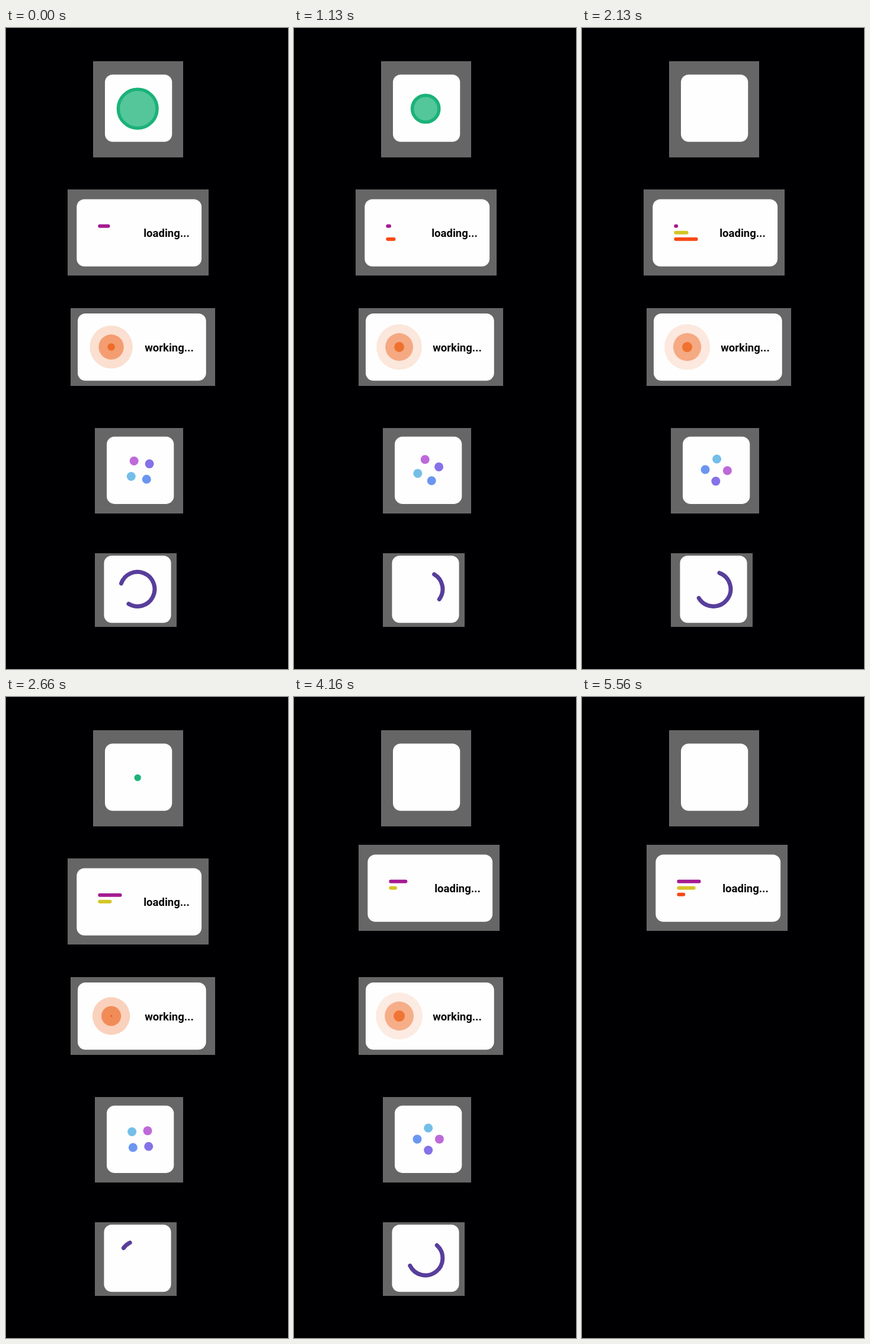
Animation, 476 px wide and 1080 px high, one loop 5600 ms. Source, as an HTML page:

```html
<!DOCTYPE html>
<html lang="en">
<head>
<meta charset="utf-8">
<title>Loaders</title>
<style>
  html, body { margin: 0; width: 100%; height: 100%; overflow: hidden; background: #000002; }
  svg { display: block; width: 476px; height: 1080px; }
  text { font: 700 18.5px Roboto, "Open Sans", sans-serif; fill: #060608; }
  .back { fill: #666; }
  .card { fill: #fefefe; }
  .bar { stroke-width: 6; stroke-linecap: round; }
</style>
</head>
<body>
<svg id="stage" viewBox="0 0 476 1080"></svg>
<script>
const LOOP = 5600;
const MOVE_AT = 4060;
const stage = document.getElementById('stage');

function add(parent, tag, attrs) {
  const el = document.createElementNS('http://www.w3.org/2000/svg', tag);
  set(el, attrs);
  parent.appendChild(el);
  return el;
}

function set(el, attrs) {
  for (const k in attrs) el.setAttribute(k, attrs[k]);
}

function panel(back, card) {
  const g = add(stage, 'g', {});
  const rect = ([x, y, width, height], cls, rx) =>
    add(g, 'rect', { x, y, width, height, class: cls, rx });
  rect(back, 'back', 0);
  rect(card, 'card', 13);
  return g;
}

const unit = v => Math.min(1, Math.max(0, v));
const mod = (v, n) => ((v % n) + n) % n;
const show = (el, on) => el.style.display = on ? '' : 'none';
const easeOut = power => x => 1 - (1 - x) ** power;
const smoothstep = x => x * x * (3 - 2 * x);

// cubic-bezier(.4, 0, .2, 1)
function fastOutSlowIn(x) {
  let lo = 0, hi = 1;
  for (let i = 0; i < 20; i++) {
    const s = (lo + hi) / 2, r = 1 - s;
    if (1.2 * r * r * s + 0.6 * r * s * s + s * s * s < x) lo = s; else hi = s;
  }
  return smoothstep(lo);
}

// Pulsing disc: grows fast, then thins and fades in place
const pulsePanel = panel([147, 56, 152, 162], [167, 78.5, 113.3, 113.3]);
const disc = add(pulsePanel, 'circle', { cx: 222.2, cy: 136, fill: '#1cb47a', stroke: '#1bb279' });

function drawPulse(t) {
  const p = t % 1640;
  const growing = p > 1010;
  const size = growing ? easeOut(5)(unit((p - 1010) / 580)) : 1;
  const left = growing ? 1 : unit(1 - p / 340);
  show(disc, left > 0);
  set(disc, {
    r: 32.8 * size,
    'stroke-width': 5.5 * left ** 3,
    'stroke-opacity': left ** 0.5,
    'fill-opacity': 0.755 * left ** 1.3
  });
}

// Bars that grow, wait and shrink one after another
const barPanel = panel([104, 272, 238, 145], [119.3, 288.5, 210.8, 113.3]);
const bars = ['#a51b91', '#d5c526', '#f74914'].map((stroke, i) =>
  add(barPanel, 'line', { class: 'bar', stroke, x1: 158.3, y1: 333.7 + i * 11, y2: 333.7 + i * 11 }));
add(barPanel, 'text', { x: 232.2, y: 352.3 }).textContent = 'loading...';

function drawBars(t) {
  const moved = t >= MOVE_AT;
  const start = (moved ? MOVE_AT : 0) - 130;
  set(barPanel, { transform: moved ? 'translate(5 -23)' : '' });
  bars.forEach((bar, i) => {
    const p = mod(t - start - i * 161, 1236);
    const len = 34.3 * unit(Math.min(p, 1033 - p) / 316);
    show(bar, len > 0.1);
    set(bar, { x2: 158.3 + len });
  });
}

// Ripples
const ripplePanel = panel([109, 472, 244, 131], [121, 481, 216.7, 113.2]);
const rings = [0, 1, 2].map(() =>
  add(ripplePanel, 'circle', { cx: 177.6, cy: 537.5, fill: 'rgb(237,100,30)' }));
add(ripplePanel, 'text', { x: 234.2, y: 545 }).textContent = 'working...';

function drawRipples(t) {
  const first = (6.2 + t * 0.0152) % 15;
  rings.forEach((ring, i) => {
    const r = first + i * 15;
    set(ring, { r, 'fill-opacity': 1 - r / 45 });
  });
  show(ripplePanel, t < 5250);
}

// Dots that turn once, turn back and rest
const dotPanel = panel([150, 674, 149, 144], [170, 688.6, 113.3, 113.3]);
const dots = ['#be69d9', '#8671e8', '#6a96f0', '#74bee8'].map(fill =>
  add(dotPanel, 'circle', { r: 7.5, fill }));

function drawDots(t) {
  const p = mod(t + 420, 2495);
  const turn = fastOutSlowIn(unit(Math.min(p, 2000 - p) / 1000)) * 2 * Math.PI;
  dots.forEach((dot, i) => {
    const a = turn + i * Math.PI / 2;
    set(dot, { cx: 226.7 + 18.7 * Math.cos(a), cy: 744.9 + 18.7 * Math.sin(a) });
  });
  show(dotPanel, t < 5480);
}

// Arc whose head and tail take turns to run once around, on a steady spin
const arcPanel = panel([150, 885, 138, 124], [165.4, 889, 113.2, 113.2]);
const arc = add(arcPanel, 'path', {
  fill: 'none', stroke: '#583e9b', 'stroke-width': 7, 'stroke-linecap': 'round'
});

function turns(t, start, length, ease) {
  const p = t - start;
  return Math.floor(p / 2000) + ease(unit(mod(p, 2000) / length));
}

function drawArc(t) {
  const spin = t * 0.18;
  const tail = 457 + spin + 360 * turns(t, 1650, 1000, smoothstep);
  const head = 485 + spin + 360 * turns(t, 1030, 1120, easeOut(2.2));
  const at = deg => {
    const a = deg * Math.PI / 180;
    return `${221.9 + 29 * Math.cos(a)} ${945.4 + 29 * Math.sin(a)}`;
  };
  const large = head - tail > 180 ? 1 : 0;
  set(arc, { d: `M${at(tail)}A29 29 0 ${large} 1 ${at(head)}` });
  show(arcPanel, t < 5480);
}

const parts = [drawPulse, drawBars, drawRipples, drawDots, drawArc];
const begin = performance.now();

function frame() {
  const t = (performance.now() - begin) % LOOP;
  parts.forEach(draw => draw(t));
  requestAnimationFrame(frame);
}
frame();
</script>
</body>
</html>
```
